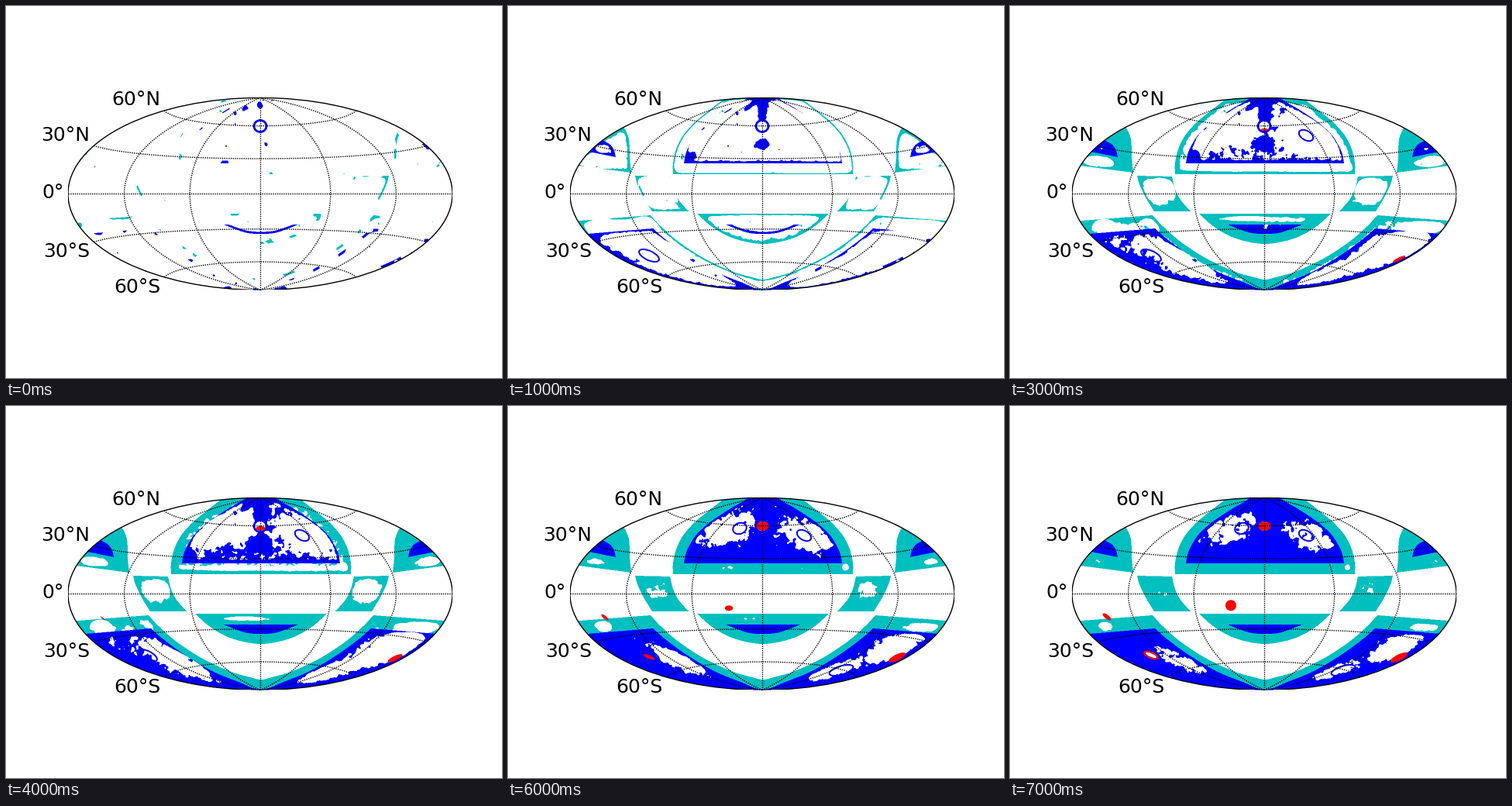
Write a matplotlib script that moves like this. It is 640 by 480 pixels and loops after 8 s.

```python
import numpy as np
import matplotlib.pyplot as plt
from matplotlib.animation import FuncAnimation
from matplotlib.patches import Ellipse, Rectangle
from matplotlib.path import Path

W, H, S = 640, 480, 2            # stage size and supersampling
CX, CY, A, B = 328, 242.4, 248, 124
AXIS2 = 658                      # x + mirrored x
CYAN, BLUE, RED = (0, .75, .75), (0, 0, 1), (1, 0, 0)
STATES = 8

rng = np.random.default_rng(5)
gy, gx = np.mgrid[0:H * S, 0:W * S]
gx, gy = (gx + .5) / S, (gy + .5) / S
GRID = np.column_stack([gx.ravel(), gy.ravel()])
SKY = ((gx - CX) / A) ** 2 + ((gy - CY) / B) ** 2 <= 1


# ---- geometry -------------------------------------------------------------
def curve(pts, n=10):
    """Catmull-Rom curve through the points."""
    p = np.array(pts, float)
    p = np.vstack([2 * p[0] - p[1], p, 2 * p[-1] - p[-2]])
    t = np.linspace(0, 1, n)[:, None]
    return np.vstack([
        .5 * (2 * b + (c - a) * t + (2 * a - 5 * b + 4 * c - d) * t ** 2
              + (3 * b - a - 3 * c + d) * t ** 3)
        for a, b, c, d in zip(p, p[1:], p[2:], p[3:])])


def mirror(pts):
    return np.array(pts, float) * (-1, 1) + (AXIS2, 0)


def symmetric(half):
    """Join a left half with its mirror image."""
    right = mirror(half)[::-1]
    if np.allclose(right[0], half[-1]):
        right = right[1:]
    return curve(np.vstack([half, right]))


def inside(poly):
    return Path(poly).contains_points(GRID).reshape(gx.shape) & SKY


def below(level, half):
    """Everything on the sky under a symmetric line that starts at the rim."""
    return inside(np.vstack([[(60, level)], symmetric(half), [(598, level)],
                             [(600, 390), (60, 390)]]))


def blur(img, sigma):
    fy = np.fft.fftfreq(H * S, 1 / S)[:, None]
    fx = np.fft.rfftfreq(W * S, 1 / S)[None]
    k = np.exp(-2 * (np.pi * sigma) ** 2 * (fx ** 2 + fy ** 2))
    return np.fft.irfft2(np.fft.rfft2(img) * k, s=img.shape)


def speckle(sigma):
    n = blur(rng.standard_normal(gx.shape), sigma)
    return n / n.std()


NOISE = .8 * speckle(2.4) + .6 * speckle(1.1)
PATCHY = speckle(5)


def bump(x, y, rx, ry, angle=0):
    a = np.radians(angle)
    dx, dy = gx - x, gy - y
    u = dx * np.cos(a) + dy * np.sin(a)
    v = dy * np.cos(a) - dx * np.sin(a)
    return np.exp(-((u / rx) ** 2 + (v / ry) ** 2) ** 1.5)


# ---- coverage: the state at which each spot gets filled --------------------
fill = {CYAN: np.full(gx.shape, 99.), BLUE: np.full(gx.shape, 99.)}


def cover(color, mask, base, sigma, noise=.3, holes=(), cuts=(),
          edge_of=None, first=1.2):
    """Fill inwards from the edge; holes fill late and cuts fill early."""
    shape = mask if edge_of is None else edge_of
    edge = np.clip(2 * blur(shape.astype(float), sigma) - 1, 0, 1)
    when = (base + noise * NOISE) * edge
    for *place, amp in holes:
        when += amp * bump(*place)
    for place in cuts:
        keep = 1 - bump(*place)
        when *= keep
        edge = edge * keep
    start = (edge < .4) & (PATCHY > first) | (NOISE < -2.9)
    when = np.where(start, 0, np.maximum(when, .5))
    fill[color] = np.where(mask, np.minimum(fill[color], when), fill[color])


# northern dome
dome = inside(symmetric([(213, 217), (213, 203), (217, 185), (226, 167),
                         (241, 150), (258, 136), (276, 122), (290, 112)]))
dome_in = inside(symmetric([(227, 203), (229, 192), (234, 180), (244, 165),
                            (262, 149), (286, 133), (305, 122), (318, 112)]))
cover(CYAN, dome & ~dome_in, 4.1, 5, edge_of=dome,
      holes=[(290, 210, 55, 4, 0, 2), (388, 211, 55, 4, 0, 2), (436, 208, 5, 5, 0, 5)])
cover(BLUE, dome_in, 3.3, 2.5, 1,
      holes=[(283, 157, 44, 23, -17, 5.5), (387, 167, 38, 20, 28, 5.5)],
      cuts=[(328, 118, 22, 9), (314, 128, 16, 4, -35), (328, 136, 9, 28),
            (329, 203, 150, 4), (328, 178, 12, 10), (236, 194, 9, 8)])

# southern lens, whose core fills from its lower arc
lens = inside(symmetric([(244, 268), (262, 284), (284, 297), (306, 304), (329, 307)]))
lens_in = inside(symmetric([(281, 282), (296, 288), (312, 293), (329, 294)]))
cover(CYAN, lens & ~lens_in, 1.9, 5, edge_of=lens,
      holes=[(303, 274, 28, 3.5, 0, 4), (352, 275, 40, 4.5, 0, 2)])
cover(BLUE, lens_in, 2.6, 5, .5, edge_of=lens_in | (gy < 283), first=-9)

# equatorial patches and the wings at the rims, each with a mirrored twin
patch = np.vstack([curve([(164, 219), (167, 230), (175, 247), (186, 265)]),
                   curve([(233, 265), (220, 250), (213, 236), (209, 220)])])
wing = np.vstack([curve([(159, 215), (157, 195), (156, 172), (149, 156), (140, 148)]),
                  [(60, 140), (60, 202)]])
wing_in = np.vstack([curve([(139, 195), (137, 187), (132, 179), (120, 172), (112, 166)]),
                     [(60, 166), (60, 179)]])
for flip, sign in ((np.array, 1), (mirror, -1)):
    (hx, hy), (wx, wy), (bx, by) = flip([(194, 238), (110, 201), (121, 185)])
    cover(CYAN, inside(flip(patch)), 1.7, 4, .5, [(hx, hy, 23, 18, 0, 5)])
    outer, inner = inside(flip(wing)), inside(flip(wing_in))
    cover(CYAN, outer & ~inner, 2.2, 5, .3, [(wx, wy, 22, 7, 8 * sign, 5)], edge_of=outer)
    cover(BLUE, inner, 1.5, 4, .4, [(bx, by, 8, 4, 15 * sign, 1.6)])

# southern band and cap
south = below(279.5, [(184, 270), (197, 284), (220, 304), (252, 325),
                      (288, 342), (315, 350), (329, 353)])
cap = below(297.5, [(187, 287), (203, 301), (232, 322), (266, 342),
                    (300, 356), (329, 366)])
cover(CYAN, south & ~cap, 3.5, 5.5, .4, edge_of=south,
      holes=[(123, 283, 13, 9, 20, 5.5), (181, 279, 12, 6, 30, 2),
             (538, 285, 28, 7, 0, 5.5)])
cover(BLUE, cap, 3.6, 6, .9,
      holes=[(226, 329, 46, 13, 25, 5.2), (503, 309, 46, 17, -22, 5.6),
             (418, 342, 44, 9, -18, 5), (150, 322, 60, 16, 25, -.9)])


def picture(k):
    """RGBA image of the area covered in state k."""
    out = np.zeros((H, W, 4))
    for color, when in fill.items():
        part = (when <= k).reshape(H, S, W, S).mean((1, 3))
        out[..., :3] += part[..., None] * np.array(color)
        out[..., 3] += part
    out[..., :3] /= np.maximum(out[..., 3:], 1e-9)
    return np.clip(out, 0, 1)


# ---- figure ----------------------------------------------------------------
fig = plt.figure(figsize=(6.4, 4.8), dpi=100, facecolor="white")
ax = fig.add_axes([0, 0, 1, 1])
ax.set_xlim(0, W)
ax.set_ylim(H, 0)
ax.axis("off")

pictures = [picture(k) for k in range(STATES)]
image = ax.imshow(pictures[0], extent=(0, W, H, 0), aspect="auto",
                  interpolation="nearest", zorder=1)


def oval(x, y, rx, ry, angle=0, **style):
    return ax.add_patch(Ellipse((x, y), 2 * rx, 2 * ry, angle=angle, **style))


# scan rings: first state, then shape and line width
rings = [(first, oval(*shape, fc="white" if first == 0 else "none",
                      ec=BLUE, lw=lw, zorder=2))
         for first, *shape, lw in [(0, 328, 155, 8, 7.5, 0, 2),
                                   (3, 382, 167, 10, 6, 30, 1.4),
                                   (6, 299, 158, 9, 7, -20, 1.4),
                                   (1, 182, 322, 14, 6, 25, 1.4),
                                   (5, 430, 341, 16, 5.5, -17, 1.4)]]

# red finds grow upwards from their lower edge: first and full state, then shape
finds = [(first, full, oval(*shape, color=RED, lw=0, zorder=3))
         for first, full, *shape in [(2, 5, 502, 324.5, 12, 4, -26),
                                     (3, 6, 328.5, 155, 8, 6, 0),
                                     (4, 7, 125, 272, 6.5, 2.6, 38),
                                     (6, 7, 182, 321.5, 10.5, 4.5, 23),
                                     (6, 7, 285, 257.3, 7, 7, 0)]]
full_size = [(e.center, e.width, e.height) for *_, e in finds]
core = oval(182, 321.5, 7.5, 2.2, 23, color="white", lw=0, zorder=3)


# ---- graticule and labels --------------------------------------------------
def hammer(lon, lat):
    lon, lat = np.radians(lon) / 2, np.radians(lat)
    d = np.sqrt(1 + np.cos(lat) * np.cos(lon))
    return CX + A * np.cos(lat) * np.sin(lon) / d, CY - B * np.sin(lat) / d


dotted = dict(color="black", lw=1, ls=(0, (1, 1)), zorder=4)
for lon in range(-120, 121, 60):
    ax.plot(*hammer(lon, np.linspace(-90, 90, 181)), **dotted)
for lat in range(-60, 61, 30):
    ax.plot(*hammer(np.linspace(-180, 180, 361), lat), **dotted)
    x, y = hammer(-180, lat)
    side, va = [("", "center"), ("N", "bottom"), ("S", "top")][np.sign(lat)]
    gap = B / 100 if lat < 0 else -B / 100
    ax.text(x - A / 50, y + gap - .45, f"{abs(lat)}°{side}",
            fontsize=18, family="DejaVu Sans", ha="right", va=va)

rim = oval(CX, CY, A, B, fill=False, ec="black", lw=1, zorder=5)
rim.set_clip_path(Rectangle((CX - A, CY - B), 2 * A, 2 * B, transform=ax.transData))


def update(k):
    image.set_data(pictures[k])
    for first, ring in rings:
        ring.set_visible(k >= first)
    for (first, full, e), ((x, y), w, h) in zip(finds, full_size):
        g = np.clip((k - first + 1) / (full - first + 1), 0, 1)
        e.set_visible(g > 0)
        e.set_center((x, y + h / 2 * (1 - g)))
        e.width, e.height = w * (.5 + .5 * g), h * g
    core.set_visible(k == STATES - 1)
    return [image]


anim = FuncAnimation(fig, update, frames=STATES, interval=1000,
                     repeat=True, repeat_delay=0, blit=False)
plt.show()
```
